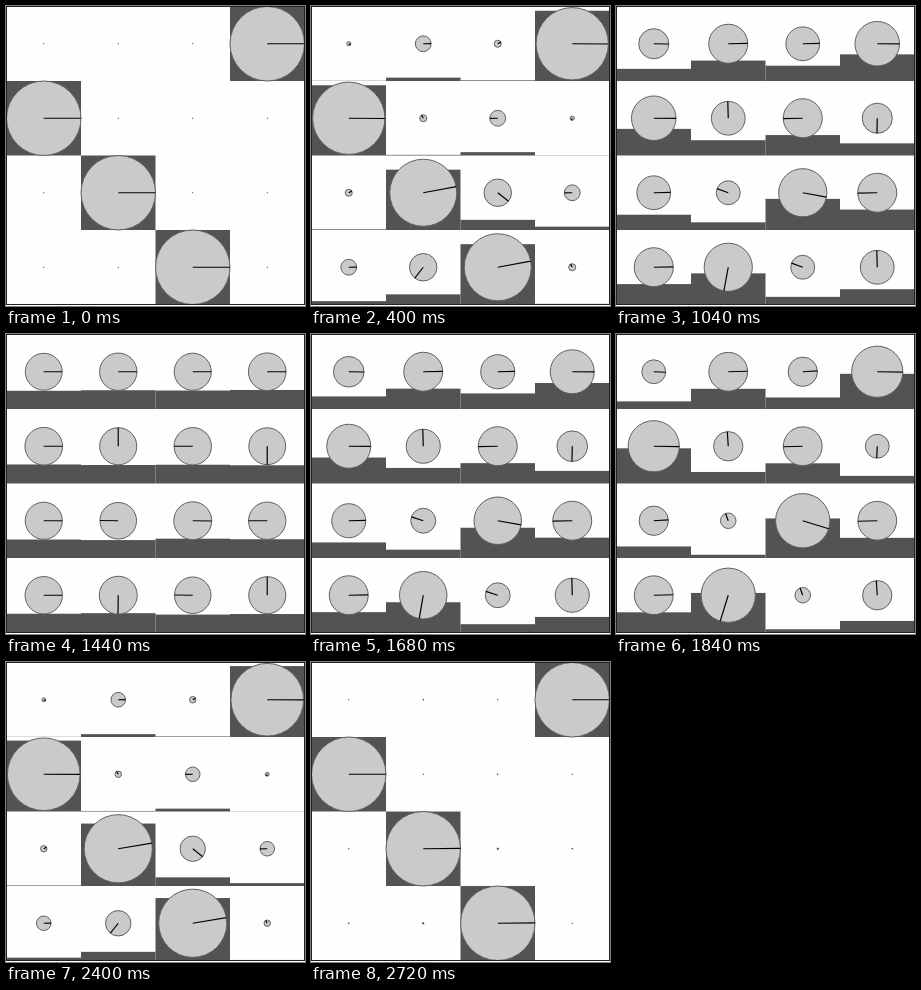
An HTML page with a canvas that plays this animation: 299x300 px, repeating every 2.8 s.

```html
<!DOCTYPE html>
<html>
<head>
<meta charset="utf-8">
<style>
html, body { margin: 0; overflow: hidden; background: #fefefe; }
canvas { display: block; }
</style>
</head>
<body>
<canvas id="stage" width="299" height="300"></canvas>
<script>
// A 4x4 unitary moving from the cyclic shift S to the Fourier matrix F and back:
// M(s) = S V^s with V = S^-1 F. Each cell shows one complex entry.
const ctx = document.getElementById('stage').getContext('2d');
const LOOP = 2800, STEP = 80, CELL = 74.5, EDGE = 0.5;
const INDICES = [0, 1, 2, 3];

const polar = (r, angle) => [r * Math.cos(angle), r * Math.sin(angle)];
const add = (a, b) => [a[0] + b[0], a[1] + b[1]];
const mul = (a, b) => [a[0] * b[0] - a[1] * b[1], a[0] * b[1] + a[1] * b[0]];
const sum = f => INDICES.map(f).reduce(add);
const matrix = f => INDICES.map(j => INDICES.map(k => f(j, k)));

const V = matrix((j, k) => polar(0.5, (j + 1) * k * Math.PI / 2));
const powers = [matrix((j, k) => [j === k ? 1 : 0, 0])];
for (let n = 1; n < 4; n++) {
  const last = powers[n - 1];
  powers.push(matrix((j, k) => sum(i => mul(last[j][i], V[i][k]))));
}
const eigenAngles = [-5, -1, 3, 7].map(n => n * Math.PI / 8);

// V^4 is a multiple of the identity, so V^s is a mix of I, V, V^2 and V^3.
function unitary(s) {
  const weights = INDICES.map(n => sum(k => polar(0.25, eigenAngles[k] * (s - n))));
  return matrix((j, k) => sum(n => mul(weights[n], powers[n][(j + 3) % 4][k])));
}

function progress(t) {
  const x = Math.min(t / 1344, (2808 - t) / 1440, 1);
  return x * x * (3 - 2 * x);
}

function drawCell(row, col, [re, im]) {
  const x = EDGE + col * CELL, y = EDGE + row * CELL, half = CELL / 2;
  const cx = x + half, cy = y + half;
  const size = Math.hypot(re, im), height = size * size * CELL;

  ctx.fillStyle = '#535353';
  ctx.fillRect(x, y + CELL - height, CELL, height);

  ctx.beginPath();
  ctx.arc(cx, cy, Math.max(size * half, 0.3), 0, 2 * Math.PI);
  ctx.fillStyle = '#c9cbc9';
  ctx.fill();
  ctx.strokeStyle = '#606060';
  ctx.stroke();

  ctx.beginPath();
  ctx.moveTo(cx, cy);
  ctx.lineTo(cx + re * half, cy - im * half);
  ctx.strokeStyle = '#000';
  ctx.lineWidth = 1.2;
  ctx.stroke();
  ctx.lineWidth = 1;
}

function draw(now) {
  const t = Math.floor(now % LOOP / STEP) * STEP;
  ctx.fillStyle = '#fefefe';
  ctx.fillRect(0, 0, 299, 300);
  ctx.lineWidth = 1;
  unitary(progress(t)).forEach((cells, row) =>
    cells.forEach((value, col) => drawCell(row, col, value)));
  ctx.strokeStyle = '#222';
  ctx.strokeRect(EDGE, EDGE, 4 * CELL, 4 * CELL);
}

let start;
function tick(now) {
  start ??= now;
  draw(now - start);
  requestAnimationFrame(tick);
}
draw(0);
requestAnimationFrame(tick);
</script>
</body>
</html>
```
